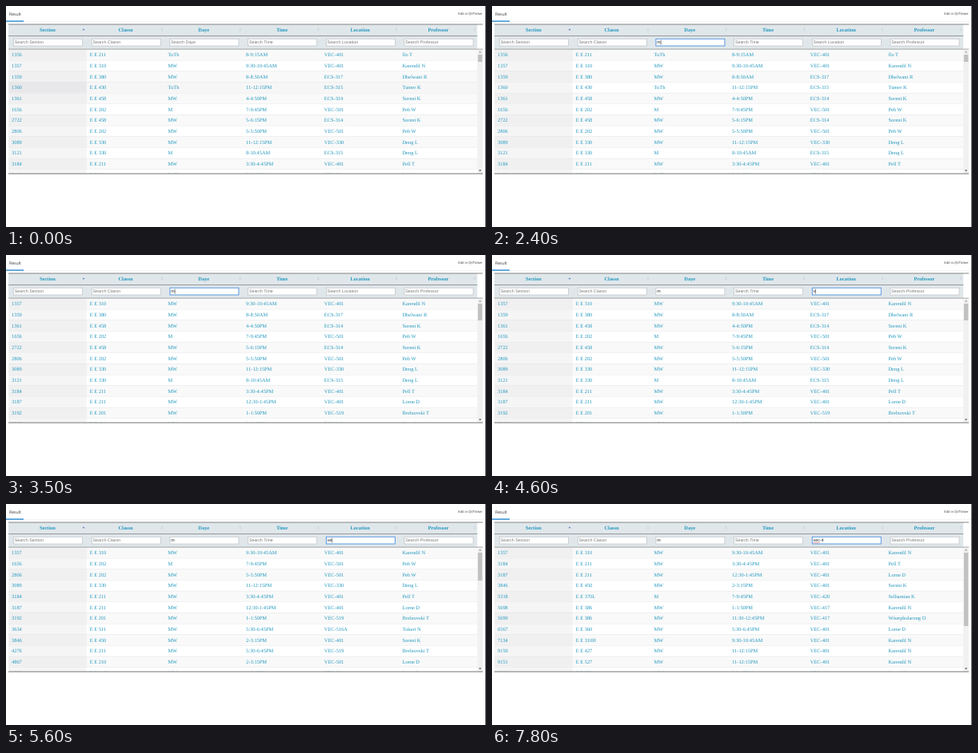
Write an HTML page that moves like this. It is 600 px wide and 277 px high and loops after 8 s.

```html
<!DOCTYPE html>
<html lang="en">
<head>
<meta charset="utf-8">
<title>Class search table</title>
<style>
html, body { margin: 0; width: 100%; height: 100%; overflow: hidden; background: #fff; }
svg { display: block; width: 100%; height: 100%; text-rendering: geometricPrecision; }
.cell, .head { font: 6.4px "Liberation Serif", "Times New Roman", serif; fill: #2197bd; }
.head { font-weight: bold; text-anchor: middle; }
.field { font: 5.33px "Liberation Sans", Arial, sans-serif; fill: #222; }
.hint { fill: #777; }
.tab { font: 5.2px "Open Sans", sans-serif; fill: #333; }
.edit { font: 4.1px "Open Sans", sans-serif; fill: #333; text-anchor: end; }
</style>
</head>
<body>
<svg id="stage" viewBox="0 0 600 277"></svg>
<script>
const LOOP = 8000, LEFT = 3, COL = 97.7, TOP = 54.2, ROW = 13.67, END = 210;
const heads = ["Section", "Classn", "Daye", "Time", "Location", "Professor"];
const rows = `1356|E E 211|TuTh|8-9:15AM|VEC-401|Ilo T
1357|E E 310|MW|9:30-10:45AM|VEC-401|Karendil N
1359|E E 380|MW|8-8:50AM|ECS-317|Dhelwani R
1360|E E 430|TuTh|11-12:15PM|ECS-315|Tumer K
1361|E E 458|MW|4-4:50PM|ECS-314|Soreni K
1656|E E 202|M|7-9:45PM|VEC-501|Peh W
2722|E E 458|MW|5-6:15PM|ECS-314|Soreni K
2806|E E 202|MW|5-5:50PM|VEC-501|Peh W
3089|E E 330|MW|11-12:15PM|VEC-330|Deng L
3121|E E 330|M|8-10:45AM|ECS-315|Deng L
3184|E E 211|MW|3:30-4:45PM|VEC-401|Pell T
3186|E E 201|TuTh|5-6:15PM|VEC-501|Peh W
3187|E E 211|MW|12:30-1:45PM|VEC-401|Lorne D
3192|E E 201|MW|1-1:50PM|VEC-519|Brelnovski T
3215|E E 420|MW|2-3:15PM|ECS-316|Deng L
3634|E E 511|MW|5:30-6:45PM|VEC-516A|Tokuri N
3846|E E 450|MW|2-3:15PM|VEC-401|Soreni K
4276|E E 211|MW|5:30-6:45PM|VEC-519|Brelnovski T
4867|E E 210|MW|2-3:15PM|VEC-501|Lorne D
4930|E E 210L|MW|4-6:45PM|VEC-501|Lorne D
5318|E E 370L|M|7-9:45PM|VEC-420|Selhamian K
5698|E E 386|MW|1-1:50PM|VEC-417|Karendil N
5699|E E 386|MW|11:30-12:45PM|VEC-417|Wisetpholarong D
6567|E E 360|MW|5:30-6:45PM|VEC-401|Lorne D
7134|E E 310H|MW|9:30-10:45AM|VEC-401|Karendil N
9150|E E 427|MW|11-12:15PM|VEC-401|Karendil N
9151|E E 527|MW|11-12:15PM|VEC-401|Karendil N
9260|E E 550|MW|2-3:15PM|VEC-401|Soreni K`.split("\n").map(r => r.split("|"));

// Each list holds [start time, value]; the latest started value applies.
const at = (list, t) => list.filter(([start]) => start <= t).pop()[1];
const focusTimes = [[0, -1], [1700, 2], [3700, -1], [4000, 4]];
const dayTimes = [[0, ""], [2400, "m"]];
const placeTimes = [[0, ""], [4600, "v"], [4900, "ve"], [6500, "vec"], [6700, "vec-"], [7300, "vec-4"]];
const caretTimes = [[0, 1], [2100, 0], [2400, 1], [2900, 0], [3500, 1], [4500, 0], [4600, 1],
  [5700, 0], [6200, 1], [7000, 0], [7300, 1], [7800, 0]];
const resultTimes = [
  [0, { day: "", place: "", thumb: 9 }],
  [2600, { day: "M", place: "", thumb: 21 }],
  [5000, { day: "M", place: "VEC", thumb: 35 }],
  [7400, { day: "M", place: "VEC-4", thumb: 92 }]];

const rect = (x, y, w, h, fill, extra = "") =>
  `<rect x="${x}" y="${y}" width="${w}" height="${h}" fill="${fill}" ${extra}/>`;
const text = (x, y, cls, s) => `<text x="${x}" y="${y}" class="${cls}">${s}</text>`;
const path = (d, fill) => `<path d="${d}" fill="${fill}"/>`;

const ruler = document.createElement("canvas").getContext("2d");
ruler.font = '53.3px "Liberation Sans", Arial, sans-serif';
const widthOf = s => ruler.measureText(s).width / 10;

function body({ day, place, thumb }, hover) {
  const shown = rows.filter(r => r[2].includes(day) && r[4].startsWith(place)).slice(0, 12);
  let out = '<clipPath id="view"><rect y="54" width="600" height="156"/></clipPath><g clip-path="url(#view)">';
  shown.forEach((r, i) => {
    const y = TOP + i * ROW, over = i === hover;
    out += rect(LEFT, y, COL * 6, ROW, over ? "#f6f6f6" : i % 2 ? "#fff" : "#f9f9f9");
    out += rect(LEFT, y, COL, ROW, over ? "#e8e8ea" : i % 2 ? "#f5f5f6" : "#f0f0f1");
    out += rect(LEFT, y, COL * 6, .4, "#ddd");
    r.forEach((s, c) => out += text(LEFT + 4 + c * COL, y + 9, "cell", s));
  });
  out += "</g>" + rect(589.2, 54, 6.8, 156, "#f1f1f1") + rect(589.9, 61, 5.4, thumb, "#c1c1c1");
  return out + path("M591 58.6h3.2l-1.6-2z", "#999") + path("M591 205.5h3.2l-1.6 2z", "#555");
}

function header(values, focus, caret) {
  let out = rect(LEFT, 23, COL * 6, 31, "#e0e7eb");
  heads.forEach((h, c) => {
    const x = LEFT + c * COL, left = x + 6.5, v = values[c] || "", on = c === focus;
    out += text(x + COL / 2, 32.1, "head", h);
    if (c) out += path(`M${x + 92.8} 28.9h3l-1.5-1.7zm0 1h3l-1.5 1.7z`, "#c9d0da");
    else out += path("M95.5 30.2h3l-1.5-2z", "#5b78c4");
    out += rect(left, 41.2, 86, 8.8, "#fff", `stroke="${on ? "#4a90d9" : "#b5babd"}" stroke-width="${on ? .9 : .6}"`);
    out += text(left + 1.3, 47.4, v ? "field" : "field hint", v || "Search " + h);
    if (on && caret) out += rect(left + 1.5 + widthOf(v), 42.6, .5, 6, "#111");
    if (v.startsWith("vec")) out += rect(left + 1.3, 48.3, widthOf("vec"), .6, "#e66");
  });
  return out + rect(LEFT, 22.6, 593, .8, "#666") + rect(LEFT, 37.1, COL * 6, .7, "#777") +
    rect(LEFT, 53.7, 593, .7, "#888");
}

function picture(t) {
  const values = { 2: at(dayTimes, t), 4: at(placeTimes, t) };
  return rect(0, 0, 600, 277, "#fff") +
    text(4, 11.8, "tab", "Result") + text(595.5, 11.3, "edit", "Edit in QVTinker") +
    rect(0, 19.2, 599, .4, "#e4e4e4") + rect(0, 18.4, 22, 1.3, "#1c84cf") +
    body(at(resultTimes, t), t < 300 ? 3 : -1) +
    header(values, at(focusTimes, t), at(caretTimes, t)) +
    rect(LEFT, END - .3, 593, .9, "#666") + rect(599.2, 0, .8, 277, "#333");
}

const stage = document.getElementById("stage");
let last = "";
function tick() {
  const next = picture(performance.now() % LOOP);
  if (next !== last) stage.innerHTML = last = next;
  requestAnimationFrame(tick);
}
tick();
</script>
</body>
</html>
```
